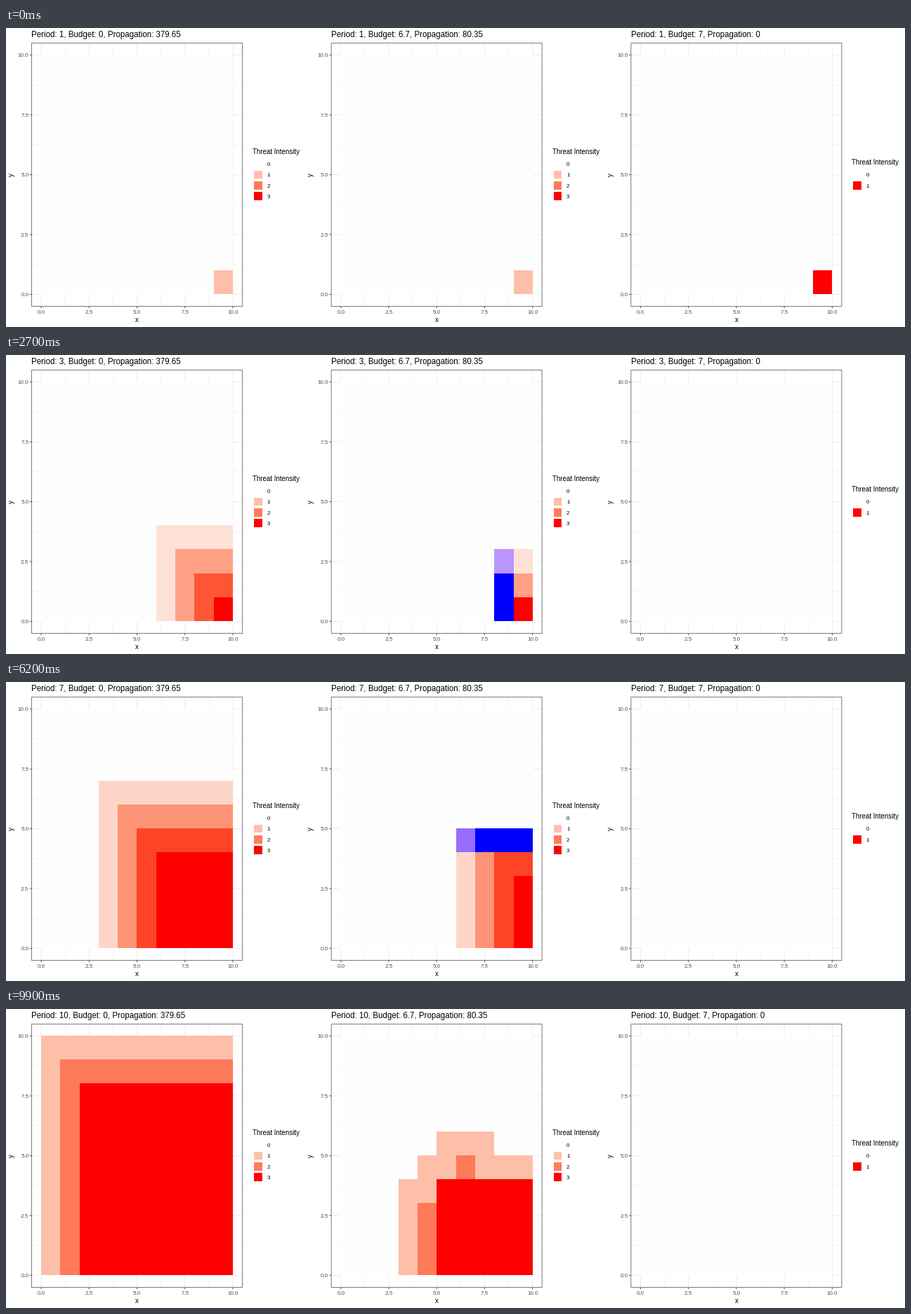
Recreate the animation shown at these times as a matplotlib script. Size 1280 by 427 pixels, loop 10 s.

```python
import numpy as np
import matplotlib.pyplot as plt
from matplotlib.animation import FuncAnimation
from matplotlib.patches import Rectangle

W, H, DPI = 1280, 427, 64
PT = 72 / DPI              # points per pixel
STEPS, PERIODS = 11, 10    # frames per transition, number of states
SHIFT = W / 3              # distance between panels
LEFT, RIGHT, TOP, BOTTOM = 36.5, 336.5, 21.5, 397.5
X0, DX = 50.1, 27.29
Y0, DY = 380.4, 34.18

plt.rcParams["font.family"] = "Liberation Sans"

# --- colour: CIE Lab, D65 ---
M = np.array([[0.4124564, 0.3575761, 0.1804375],
              [0.2126729, 0.7151522, 0.0721750],
              [0.0193339, 0.1191920, 0.9503041]])
M_INV = np.linalg.inv(M)
WHITE_XYZ = M.sum(axis=1)


def to_lab(rgb):
    rgb = np.asarray(rgb, float)
    lin = np.where(rgb <= 0.04045, rgb / 12.92, ((rgb + 0.055) / 1.055) ** 2.4)
    t = M @ lin / WHITE_XYZ
    f = np.where(t > 0.008856, np.cbrt(t), 7.787 * t + 16 / 116)
    return np.array([116 * f[1] - 16, 500 * (f[0] - f[1]), 200 * (f[1] - f[2])])


def to_rgb(lab):
    fy = (lab[..., 0] + 16) / 116
    f = np.stack([fy + lab[..., 1] / 500, fy, fy - lab[..., 2] / 200], axis=-1)
    t = np.where(f > 0.206893, f ** 3, (f - 16 / 116) / 7.787)
    lin = np.clip((t * WHITE_XYZ) @ M_INV.T, 0, 1)
    rgb = np.where(lin <= 0.0031308, lin * 12.92,
                   1.055 * lin ** (1 / 2.4) - 0.055)
    return np.clip(rgb, 0, 1)


WHITE, RED, BLUE = to_lab([1, 1, 1]), to_lab([1, 0, 0]), to_lab([0, 0, 1])


def threat(level):
    """Lab colour of an intensity between 0 and 1."""
    level = np.asarray(level, float)[..., None]
    return WHITE + (RED - WHITE) * level


# --- states: a threat grows by one per period after its start ---
def build(start, treated, top=3, end=PERIODS):
    states = []
    for k in range(1, PERIODS + 1):
        value = np.clip(k - start, 0, top) * (k <= end)
        lab = threat(value / top)
        for first, last, cols, rows in treated:
            if first <= k <= last:
                lab[rows, cols] = BLUE
        states.append(lab)
    return np.array(states)


def span(a, b):
    return slice(a, b + 1)


def uncontrolled():
    row, col = np.mgrid[0:10, 0:10]
    return build(np.maximum(row, 9 - col), [])


def partly_controlled():
    start = np.full((10, 10), 99)
    for col in range(3, 9):
        start[0:4, col] = 12 - col
    start[0:4, 9] = [0, 2, 3, 4]
    start[3, 4] = 9
    start[4, 4:10] = 9
    start[4, 6] = 8
    start[5, 5:8] = 9
    treated = [(2, 2, 9, 1), (2, 4, 8, span(0, 1)), (4, 4, 8, 2),
               (6, 9, span(7, 9), 4), (7, 8, 6, 4), (8, 9, 5, 4),
               (9, 9, 4, span(3, 4))]
    return build(start, treated)


def fully_controlled():
    start = np.full((10, 10), 99)
    start[0, 9] = 0
    return build(start, [(2, 2, span(8, 9), span(0, 1))], top=1, end=1)


# --- stage ---
fig = plt.figure(figsize=(W / DPI, H / DPI), dpi=DPI, facecolor="white")
ax = fig.add_axes([0, 0, 1, 1])
ax.axis("off")


def line(xs, ys, color, width, z):
    ax.plot(xs, ys, color=color, lw=width * PT, zorder=z, snap=False,
            solid_capstyle="butt")


def text(x, y, s, px, color="black", ha="left", **kw):
    return ax.text(x, y, s, fontsize=px * PT, color=color, ha=ha,
                   va="baseline", zorder=6, **kw)


def box(x, y, w, h, color, z):
    ax.add_patch(Rectangle((x, y), w, h, fc=color, ec="none", lw=0, zorder=z))


def draw_axes(ox):
    l, r = LEFT + ox, RIGHT + ox
    for i in range(9):
        v = 1.25 * i
        x, y = X0 + ox + v * DX, Y0 - v * DY
        width = 0.5 if i % 2 else 0.95
        line([x, x], [TOP, BOTTOM], "#ebebeb", width, 1)
        line([l, r], [y, y], "#ebebeb", width, 1)
        if i % 2 == 0:
            line([x, x], [BOTTOM, BOTTOM + 2.6], "#333333", 0.95, 5)
            line([l - 2.6, l], [y, y], "#333333", 0.95, 5)
            text(x, 408.4, f"{v:.1f}", 8, "#4d4d4d", "center")
            text(l - 4.2, y + 2.9, f"{v:.1f}", 8, "#4d4d4d", "right")
    box(49 + ox, 38, 274, 343, "white", 2)
    line([l, r, r, l, l], [TOP, TOP, BOTTOM, BOTTOM, TOP], "#747474", 0.95, 5)
    text((l + r) / 2, 419.6, "x", 9.78, ha="center")
    text(ox + 10.8, 209.5, "y", 9.78, ha="center", rotation=90,
         rotation_mode="anchor")


def draw_legend(ox, top):
    first = 194 if top == 3 else 209.4
    text(351 + ox, first - 14.2, "Threat Intensity", 9.78)
    for i in range(top + 1):
        y = first + 15.36 * i
        if i:
            box(352.9 + ox, y - 5.8, 11.6, 11.6, to_rgb(threat(i / top)), 4)
        text(371.3 + ox, y + 2.9, str(i), 8)


class Panel:
    def __init__(self, index, states, top, budget, spread):
        ox = index * SHIFT
        self.states = states
        self.label = f"Period: {{}}, Budget: {budget}, Propagation: {spread}"
        draw_axes(ox)
        draw_legend(ox, top)
        self.title = text(LEFT - 0.3 + ox, 13.1, "", 11.56)
        self.tiles = ax.imshow(
            to_rgb(states[0]), origin="lower", aspect="auto",
            interpolation="nearest", zorder=3,
            extent=(X0 + ox, X0 + ox + 10 * DX, Y0, Y0 - 10 * DY))

    def show(self, time):
        k = min(int(time), PERIODS - 2)
        u = time - k
        lab = self.states[k] * (1 - u) + self.states[k + 1] * u
        self.tiles.set_data(to_rgb(lab))
        self.title.set_text(self.label.format(int(time + 1.5)))


panels = [Panel(0, uncontrolled(), 3, "0", "379.65"),
          Panel(1, partly_controlled(), 3, "6.7", "80.35"),
          Panel(2, fully_controlled(), 1, "7", "0")]
ax.set_xlim(0, W)
ax.set_ylim(H, 0)


def update(frame):
    for p in panels:
        p.show(frame / STEPS)
    return []


anim = FuncAnimation(fig, update, frames=STEPS * (PERIODS - 1) + 1,
                     interval=100, repeat=True, repeat_delay=0, blit=False)
plt.show()
```
